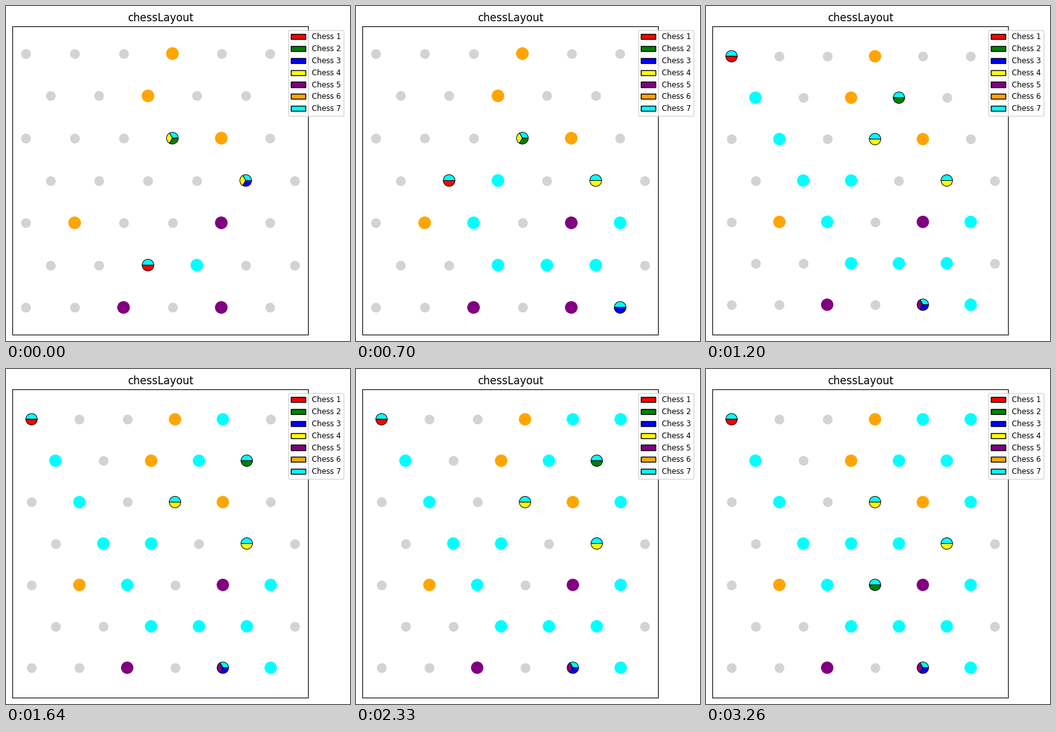
These frames come from a looping animation (541x527 px, 3.3 s). A matplotlib script:

```python
import numpy as np
import matplotlib.pyplot as plt
from matplotlib.animation import FuncAnimation
from matplotlib.patches import Circle, Patch, Wedge

W, H, DPI = 541, 527, 100
LEFT, RIGHT, TOP, BOTTOM = 10, 475, 32, 517
LOOP, TICK = 3300, 10
COLS, ROWS = 6, 7
ROW_H = np.sqrt(3) / 2
RADIUS = 0.12

COLORS = ["red", "green", "blue", "yellow", "purple", "orange", "cyan"]
RED, GREEN, BLUE, YELLOW, PURPLE, ORANGE, TRAIL = range(7)

FIXED = {
    YELLOW: [(3, 2), (4, 3)],
    PURPLE: [(4, 4), (2, 6), (4, 6)],
    ORANGE: [(3, 0), (2, 1), (4, 2), (1, 4)],
}

# Cells (column, row) walked by each piece
SPOTS = {"A": (3, 1), "B": (4, 0), "C": (4, 1), "D": (5, 0), "E": (5, 2),
         "Y": (3, 2), "S": (2, 3), "U": (3, 3), "V": (3, 4)}
PATHS = {
    RED: [(3, 5), (2, 5), (2, 4), (1, 3), (1, 2), (0, 1), (0, 0)],
    GREEN: [SPOTS[c] for c in "YSYAYABABCECDBACECACECECAYUV"],
    BLUE: [(4, 3), (5, 4), (4, 5), (5, 6), (4, 6)],
}
START = {RED: 2, GREEN: 1, BLUE: 1}
TURNS = [{"R": RED, "G": GREEN, "B": BLUE}[c]
         for c in "BGRBGBRRBRRG" + "G" * 24]

# Most moves are held 100 ms, a few are shorter
holds = np.full(len(TURNS), 100)
for i, ms in {12: 20, 15: 20, 18: 20, 20: 70, 26: 30}.items():
    holds[i] = ms
MOVE_TIMES = np.cumsum(holds)


def position(cell):
    col, row = cell
    return col + 0.5 * (row % 2), -row * ROW_H


def walked(step):
    count = dict(START)
    for piece in TURNS[:step]:
        count[piece] += 1
    return {piece: PATHS[piece][:n] for piece, n in count.items()}


def layout(trails):
    """Map every occupied cell to its pieces, highest number first."""
    cells = {}
    for trail in trails.values():
        for cell in trail:
            cells[cell] = [TRAIL]
    for kind in (ORANGE, PURPLE, YELLOW):
        for cell in FIXED[kind]:
            cells.setdefault(cell, []).append(kind)
    for piece in (BLUE, GREEN, RED):
        cells[trails[piece][-1]].append(piece)
    return cells


def fit_view(pad):
    width = COLS - 0.5 + pad
    span = 1.1 * width
    half = span * (BOTTOM - TOP) / (RIGHT - LEFT) / 2
    mid = -(ROWS - 1) * ROW_H / 2
    ax.set_xlim(-pad - 0.05 * width, COLS - 0.5 + 0.05 * width)
    ax.set_ylim(mid - half, mid + half)


def draw_cell(cell, kinds):
    xy = position(cell)
    if len(kinds) == 1:
        parts = [Circle(xy, RADIUS, color=COLORS[kinds[0]], lw=1, zorder=2)]
    else:
        turn = 360 / len(kinds)
        parts = [Wedge(xy, RADIUS, i * turn, (i + 1) * turn, fc=COLORS[k],
                       ec="black", lw=0.7, zorder=2)
                 for i, k in enumerate(kinds)]
    for part in parts:
        ax.add_patch(part)
    return parts


fig = plt.figure(figsize=(W / DPI, H / DPI), dpi=DPI, facecolor="white")
ax = fig.add_axes([LEFT / W, 1 - BOTTOM / H,
                   (RIGHT - LEFT) / W, (BOTTOM - TOP) / H])
ax.set_xticks([])
ax.set_yticks([])
ax.set_title("chessLayout", fontsize=12)

grid = [position((c, r)) for r in range(ROWS) for c in range(COLS)]
ax.scatter(*zip(*grid), s=100, color="lightgray", zorder=1)
ax.legend(handles=[Patch(facecolor=c, edgecolor="black", label=f"Chess {i}")
                   for i, c in enumerate(COLORS, 1)],
          fontsize="small", loc="upper left", bbox_to_anchor=(0.92, 1))

shown = {"step": None, "parts": []}


def update(frame):
    step = int(np.searchsorted(MOVE_TIMES, frame * TICK, side="right"))
    if step != shown["step"]:
        for part in shown["parts"]:
            part.remove()
        trails = walked(step)
        # The view widens once a piece sticks out past the left column
        fit_view(RADIUS if trails[RED][-1] == (0, 0) else 0)
        shown["parts"] = [part for cell, kinds in layout(trails).items()
                          for part in draw_cell(cell, kinds)]
        shown["step"] = step
    return shown["parts"]


anim = FuncAnimation(fig, update, frames=LOOP // TICK, interval=TICK,
                     init_func=lambda: update(0), repeat=True,
                     repeat_delay=0, blit=False)
plt.show()
```
